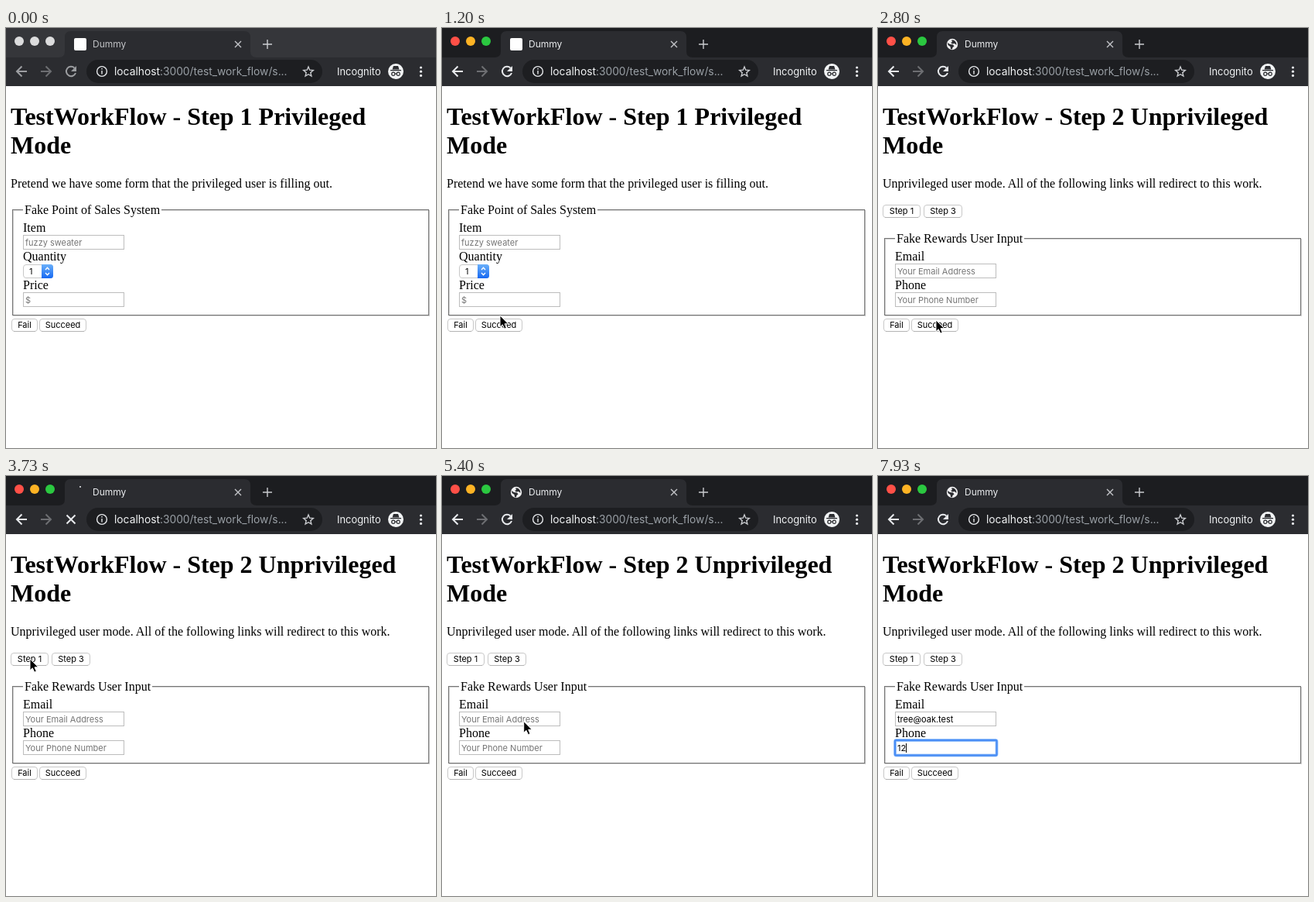
Animation, 556 px wide and 542 px high, one loop 8 s. Source, as an HTML page:

```html
<!DOCTYPE html>
<html lang="en">
<head>
<meta charset="utf-8">
<title>Dummy</title>
<style>
html, body { margin: 0; width: 100%; height: 100%; overflow: hidden; background: #fff; }
svg { display: block; font: 16px "Liberation Serif", serif; }
text { white-space: pre; }
.h1 { font-size: 32px; font-weight: bold; }
.ui { font-family: Inter, sans-serif; }
.small { font: 11px Inter, sans-serif; }
.hint { fill: #757575; }
.line { fill: none; stroke: #e8eaed; stroke-width: 2; }
.thin { stroke-width: 1.4; }
.strip { fill: #1c1d20; }
.idle .strip { fill: #35363a; }
.idle .light { fill: #dcdcdd; }
.idle .dim { opacity: .6; }
.idle .title { opacity: .78; }
.button rect { fill: #fff; stroke: #c8c8c8; }
.pressed rect { fill: #3b87f6; stroke: #2c6fdc; }
.pressed text { fill: #fff; }
</style>
</head>
<body>
<svg id="stage" width="556" height="542" viewBox="0 0 556 542"></svg>
<script>
const stage = document.getElementById('stage');

const text = (x, y, s, cls = '', more = '') => `<text x="${x}" y="${y}" class="${cls}" ${more}>${s}</text>`;

const button = (id, x, y, w, label) => `<g id="${id}" class="button">
  <rect x="${x + .5}" y="${y + .5}" width="${w - 1}" height="16" rx="3.5"/>
  <path d="M${x + 3} ${y + 16.5}h${w - 6}" stroke="#b4b4b4"/>
  ${text(x + w / 2, y + 12, label, 'small', 'text-anchor="middle"')}</g>`;

const field = (id, y, hint) => `<g id="${id}">
  <g class="ring" fill="none">
    <rect x="22" y="${y}" width="131.5" height="19.5" rx="2" stroke="#a9cdfb" stroke-width="4"/>
    <rect x="22" y="${y}" width="131.5" height="19.5" rx="1" stroke="#4a8ef5" stroke-width="2.4"/>
  </g>
  <rect class="box" x="22.5" y="${y + .5}" width="130" height="18" fill="none" stroke="#bdbdbd"/>
  ${text(25, y + 14, hint, 'small hint')}${text(25, y + 14, '', 'small typed')}
  <path class="caret" d="M0 ${y + 4}v12" stroke="#000"/></g>`;

const fieldset = (y, legendEnd, legend) => {
  const h = 370 - y;
  return `<g fill="none"><rect x="9.5" y="${y + 1.5}" width="538" height="${h}" stroke="#d0d0d0"/>
  <rect x="8.5" y="${y + .5}" width="538" height="${h}" stroke="#757575"/></g>
  <rect x="22" y="${y - 4}" width="${legendEnd - 22}" height="9" fill="#fff"/>${text(24, y + 6, legend)}`;
};

const light = (x, color) => `<circle class="light" cx="${x}" cy="17" r="6" fill="${color}"/>`;

const chrome = `
<rect class="strip" width="556" height="39"/>
<path d="M0 75V38H68q8 0 8-8V12q0-8 8-8H308q8 0 8 8V30q0 8 8 8H556V75z" fill="#2b2c30"/>
${light(17, '#ff5047')}${light(37, '#fdb324')}${light(57, '#2bc840')}
<rect id="square" x="88" y="13" width="16" height="16" rx="2" fill="#fff"/>
<g id="globe"><circle cx="96" cy="21" r="7.2" fill="#f1f1f2"/>
  <path d="M90 19l3 2 4 .5 1.5 2-2 1.5-.5 2.5-2-.5-.5-3-3-2zM95 15.5l1 2.5-2 1 2 1.5 3-.5 2.5 2q0-5-4-6.5z" fill="#2b2c30"/></g>
<circle id="spinner" cx="96" cy="21" r="7" class="line"/>
<g class="title">${text(112, 25, 'Dummy', 'ui', 'font-size="12" fill="#eceef0"')}</g>
<path d="M296 17l8 8m0-8l-8 8" class="line thin" opacity=".8"/>
<path d="M332 21h12m-6-6v12" class="line thin" opacity=".85"/>
<path d="M27 56H14m6.5-6.5L14 56l6.5 6.5" class="line dim"/>
<path d="M45 56h13m-6.5-6.5L58 56l-6.5 6.5" class="line" opacity=".35"/>
<g id="reload" class="dim"><path d="M88.5 51.5A6.2 6.2 0 1 0 90 58" class="line"/><path d="M91 49v7h-7z" fill="#e8eaed"/></g>
<path id="stop" d="M78.5 50.5l11 11m0-11l-11 11" class="line"/>
<rect x="104" y="41" width="305" height="30" rx="15" fill="#1d1e21"/>
<circle cx="124" cy="56" r="6.4" class="line thin"/><path d="M124 55v4.5m0-7.5v1.6" class="line thin"/>
${text(140, 61, 'localhost<tspan fill="#9aa0a6">:3000/test_work_flow/s...</tspan>', 'ui', 'font-size="13.8" fill="#f1f3f4"')}
<path d="M391 50l1.7 4.2 4.6.4-3.5 3 1.1 4.5-3.9-2.4-3.9 2.4 1.1-4.5-3.5-3 4.6-.4z" class="line thin" opacity=".85"/>
${text(428, 61, 'Incognito', 'ui', 'font-size="12.9" fill="#f1f3f4"')}
<circle cx="504" cy="56" r="10" fill="#f1f3f4"/>
<path d="M499.5 53.5l1.5-4.5h6l1.5 4.5zM497 54h14v1.3h-14z" fill="#2b2c30"/>
<g fill="none" stroke="#2b2c30" stroke-width="1.2"><circle cx="500.8" cy="59.3" r="2.1"/><circle cx="507.2" cy="59.3" r="2.1"/><path d="M503 59h2"/></g>
<g fill="#e8eaed"><circle cx="536.5" cy="51" r="1.6"/><circle cx="536.5" cy="56.2" r="1.6"/><circle cx="536.5" cy="61.4" r="1.6"/></g>`;

const heading = (step, mode) => text(6, 125, `TestWorkFlow - Step ${step} ${mode}`, 'h1') + text(6, 162, 'Mode', 'h1');

const sales = `<g id="sales">${heading(1, 'Privileged')}
${text(6, 206, 'Pretend we have some form that the privileged user is filling out.')}
${fieldset(234, 201, 'Fake Point of Sales System')}
${text(22, 263, 'Item')}${field('item', 267, 'fuzzy sweater')}
${text(22, 300, 'Quantity')}
<rect x="22.5" y="305.5" width="38" height="17" rx="3.5" fill="#fff" stroke="#c8c8c8"/>
<path d="M46 305h11.5q3.5 0 3.5 3.5v11q0 3.5-3.5 3.5H46z" fill="url(#blue)"/>
<path d="M51 312l2.5-2.7 2.5 2.7m-5 4l2.5 2.7 2.5-2.7" fill="none" stroke="#fff" stroke-width="1.4"/>
${text(30, 318, '1', 'small')}
${text(22, 337, 'Price')}${field('price', 341, '$')}</g>`;

const rewards = `<g id="rewards">${heading(2, 'Unprivileged')}
${text(6, 206, 'Unprivileged user mode. All of the following links will redirect to this work.')}
${button('step1', 6, 228, 49, 'Step 1')}${button('step3', 59, 228, 50, 'Step 3')}
${fieldset(271, 189, 'Fake Rewards User Input')}
${text(22, 300, 'Email')}${field('email', 304, 'Your Email Address')}
${text(22, 337, 'Phone')}${field('phone', 341, 'Your Phone Number')}</g>`;

stage.innerHTML = `<defs><linearGradient id="blue" x2="0" y2="1">
<stop stop-color="#6ab0fa"/><stop offset="1" stop-color="#1668f2"/></linearGradient></defs>
${chrome}${sales}${rewards}
${button('fail', 7, 375, 34, 'Fail')}${button('succeed', 43, 375, 61, 'Succeed')}
<path id="arrow" d="M0 0V14.8l3.3-3 2.4 5.4 2.6-1.1-2.3-5.3h4.7z" stroke="#fff" stroke-linejoin="round"/>
<path id="beam" d="M-3-7q3 0 3 2V5q0 2-3 2M3-7q-3 0-3 2V5q0 2 3 2" fill="none" stroke="#222"/>`;

const get = id => document.getElementById(id);
const show = (el, on) => el.style.display = on ? '' : 'none';
const within = (t, from, to) => t >= from && t < to;

// Pointer stops: time, x, y
const path = [[60, 375, 37], [740, 66, 363], [870, 66, 363], [1190, 75, 371], [1860, 75, 371], [1940, 75, 377],
  [2790, 75, 377], [3400, 31, 236], [3860, 31, 236], [4400, 85, 234], [4730, 85, 234], [5200, 114, 338],
  [5270, 110, 323], [5470, 104, 314]];
const loads = [[1990, 2400], [3660, 4200], [4500, 5200]];
const presses = [['succeed', 1920], ['step1', 3590], ['step3', 4460]];

function pointerAt(t) {
  const i = path.findIndex(stop => stop[0] > t);
  if (i < 0) return path[path.length - 1].slice(1);
  const [t0, x0, y0] = path[Math.max(0, i - 1)], [t1, x1, y1] = path[i];
  const p = Math.max(0, (t - t0) / (t1 - t0 || 1)), e = p * p * (3 - 2 * p);
  return [x0 + (x1 - x0) * e, y0 + (y1 - y0) * e];
}

const typedCount = (t, start, step, max) => Math.max(0, Math.min(max, Math.floor((t - start) / step) + 1));

function drawField(id, value, focused) {
  const part = name => get(id).querySelector('.' + name);
  show(part('ring'), focused);
  show(part('box'), !focused);
  show(part('hint'), !value);
  show(part('caret'), focused);
  part('typed').textContent = value;
  const end = value ? part('typed').getComputedTextLength() : 0;
  part('caret').setAttribute('transform', `translate(${Math.round(25 + end) + .5})`);
}

function draw(t) {
  const load = loads.find(([from, to]) => within(t, from, to));
  stage.classList.toggle('idle', t < 940);
  show(get('sales'), t < 2260);
  show(get('rewards'), t >= 2260);
  show(get('square'), !load && t < 2000);
  show(get('globe'), !load && t >= 2000);
  show(get('reload'), !load);
  show(get('stop'), load);
  show(get('spinner'), load);
  if (load) {
    const age = t - load[0];
    get('spinner').setAttribute('stroke-dasharray', `${Math.min(28, age ** 1.5 / 400)} 44`);
    get('spinner').setAttribute('transform', `rotate(${-95 - Math.max(0, age - 70) * .36} 96 21)`);
  }
  for (const [id, start] of presses) get(id).classList.toggle('pressed', within(t, start, start + 65));

  const count = typedCount(t, 5730, 133, 4) + typedCount(t, 6530, 82, 9);
  drawField('email', 'tree@oak.test'.slice(0, count), within(t, 5520, 7330));
  drawField('phone', '12'.slice(0, typedCount(t, 7860, 66, 2)), t >= 7330);

  const [x, y] = pointerAt(t);
  const inField = t >= 5460;
  show(get('arrow'), t >= 60 && !inField);
  show(get('beam'), inField && t < 5730);
  for (const id of ['arrow', 'beam']) get(id).setAttribute('transform', `translate(${x} ${y})`);
}

drawField('item', '', false);
drawField('price', '', false);
const start = performance.now();
function tick(now) {
  const t = Math.max(0, now - start) % 8000;
  draw(Math.floor((t + 5) * .015) / .015); // the picture moves 15 steps a second
  requestAnimationFrame(tick);
}
draw(0);
requestAnimationFrame(tick);
</script>
</body>
</html>
```
